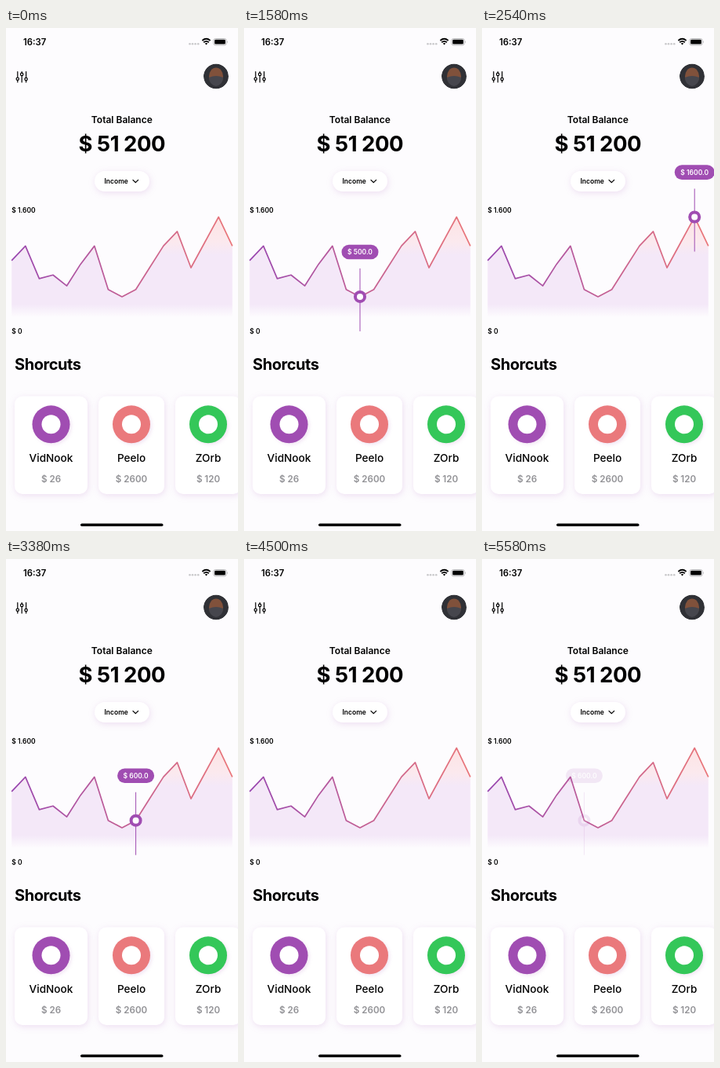
Animation of 296x640 px, one loop 5670 ms. Source, as an HTML page:

```html
<!DOCTYPE html>
<html lang="en">
<head>
<meta charset="utf-8">
<title>Balance chart</title>
<style>
  html, body { margin: 0; width: 100%; height: 100%; overflow: hidden; background: #fdfcfe; }
  svg { display: block; width: 296px; height: 640px; font-family: Inter, Roboto, sans-serif; font-weight: 600; }
  .middle { text-anchor: middle; }
  .small { font-size: 8.5px; }
  .stroke { fill: none; stroke: #000; stroke-linecap: round; stroke-linejoin: round; }
  .raised { fill: #fff; filter: drop-shadow(1px 2px 4px rgba(160, 77, 178, .17)); }
  .disc { filter: drop-shadow(2px 2px 2px rgba(160, 77, 178, .14)); }
</style>
</head>
<body>
<svg viewBox="0 0 296 640">
  <defs>
    <linearGradient id="ink" gradientUnits="userSpaceOnUse" x1="7" y1="0" x2="289" y2="0">
      <stop stop-color="#9847b0"/><stop offset="1" stop-color="#ea7679"/>
    </linearGradient>
    <linearGradient id="wash" gradientUnits="userSpaceOnUse" x1="0" y1="240" x2="0" y2="368">
      <stop stop-color="#fde3e3"/>
      <stop offset=".25" stop-color="#fbe9ee"/>
      <stop offset=".38" stop-color="#f4e8f8"/>
      <stop offset=".87" stop-color="#f4e8f8"/>
      <stop offset="1" stop-color="#f4e8f8" stop-opacity="0"/>
    </linearGradient>
    <clipPath id="portrait"><circle cx="268" cy="61.5" r="16"/></clipPath>
  </defs>

  <!-- status bar -->
  <text x="22" y="22" font-size="11.3">16:37</text>
  <g fill="#c9c9cb">
    <circle cx="234.5" cy="20.3" r="1.3"/><circle cx="238" cy="20.3" r="1.3"/>
    <circle cx="241.6" cy="20.3" r="1.3"/><circle cx="245.2" cy="20.3" r="1.3"/>
  </g>
  <g class="stroke" stroke-width="1.8" style="stroke-linecap: butt">
    <path d="M250.4 16Q255.5 11.6 260.6 16M252.2 18.3Q255.5 15.4 258.8 18.3"/>
  </g>
  <path d="M253.7 19.6Q255.5 18.2 257.3 19.6L255.5 21.6Z"/>
  <rect x="264.8" y="13.5" width="16.4" height="8.4" rx="2.5" fill="none" stroke="#a8a8aa" stroke-width=".8"/>
  <rect x="266.1" y="14.8" width="13.8" height="5.8" rx="1.4"/>
  <path d="M282.4 16.2q1.4 1.5 0 3z" fill="#a8a8aa"/>

  <!-- header -->
  <g class="stroke" stroke-width="1.2">
    <path d="M14.8 55.5V62.8M14.8 66.6V69M20.2 55.5V57M20.2 60.8V69M25.6 55.5V63.2M25.6 67V69"/>
    <circle cx="14.8" cy="64.7" r="1.7"/><circle cx="20.2" cy="58.9" r="1.7"/><circle cx="25.6" cy="65.1" r="1.7"/>
  </g>
  <g clip-path="url(#portrait)">
    <circle cx="268" cy="61.5" r="16" fill="#303136"/>
    <ellipse cx="268" cy="61.5" rx="9" ry="11" fill="#80513b"/>
    <path d="M259 63Q268 59 277 63Q277 72 268 74Q259 72 259 63Z" fill="#46464d"/>
  </g>
  <g class="middle">
    <text x="147.8" y="121" font-size="12">Total Balance</text>
    <text x="147.8" y="157" font-size="27.5" font-weight="700" letter-spacing="-.5">$ 51 200</text>
  </g>
  <rect class="raised" x="113" y="182" width="70" height="26" rx="13"/>
  <text class="small" x="125.5" y="198">Income</text>
  <path class="stroke" stroke-width="1.3" d="M162 193.4l3.3 3.2 3.3-3.2"/>

  <!-- chart -->
  <text class="small" x="7.3" y="235.3">$ 1.600</text>
  <text class="small" x="7.3" y="389.3">$ 0</text>
  <path id="area" fill="url(#wash)"/>
  <path id="line" fill="none" stroke="url(#ink)" stroke-width="1.7" stroke-linejoin="round"/>
  <g id="marker" fill="#a04db2">
    <rect x="-.5" y="-36" width="1" height="80"/>
    <circle r="8"/><circle r="4" fill="#fff"/>
    <rect id="bubble" y="-66.2" height="18.6" rx="9.3"/>
    <text id="amount" class="small middle" y="-53.8" fill="#fff"></text>
  </g>

  <text x="11" y="435.3" font-size="20" font-weight="700" letter-spacing="-.45">Shorcuts</text>
  <g id="cards"></g>
  <rect x="95" y="630.4" width="105.5" height="3.6" rx="1.8"/>
</svg>
<script>
const $ = id => document.getElementById(id);
const LOOP = 5670, FADE = 400;

const values = [1000, 1200, 750, 800, 650, 950, 1200, 600, 500, 600, 900, 1200, 1400, 900, 1250, 1600, 1200];
const points = values.map((v, i) => [7.2 + 17.6 * i, 388 - .0922 * v]);
const outline = 'M' + points.map(p => p.join(' ')).join('L');
$('line').setAttribute('d', outline);
$('area').setAttribute('d', outline + 'V368H7.2Z');

const cards = [
  { name: 'VidNook', price: '$ 26', x: 11, width: 93, color: '#a04db2' },
  { name: 'Peelo', price: '$ 2600', x: 118, width: 84, color: '#ea797c' },
  { name: 'ZOrb', price: '$ 120', x: 216, width: 84, color: '#34c759' },
];
$('cards').innerHTML = cards.map(({ name, price, x, width, color }) => `
  <rect class="raised" x="${x}" y="468.5" width="${width}" height="124.5" rx="10"/>
  <g class="middle" transform="translate(${x + width / 2} 504.3)">
    <circle class="disc" r="24" fill="${color}"/><circle r="12" fill="#fff"/>
    <text y="48" font-size="13.6" font-weight="500">${name}</text>
    <text y="73.5" font-size="11.6" fill="#929296">${price}</text>
  </g>`).join('');

// The finger snaps to a data point: [ms, point], each held until the next.
const scrub = [
  [0, 3], [1200, 3], [1310, 4], [1430, 5], [1580, 8], [1740, 10], [1860, 12], [2060, 15],
  [2700, 14], [2900, 11], [3380, 9], [3490, 7], [3770, 4], [3930, 3],
  [4160, 3], [4270, 3], [4380, 3], [4500, 3],
  [4830, 6], [4950, 6], [5060, 6], [5160, 6], [5270, 7], [5380, 7], [5480, 7], [5580, 7],
];
const touches = [{ down: 1120, up: 4080 }, { down: 4825, up: 5264 }];

function ramp(ms, start) {
  const u = Math.min(1, Math.max(0, (ms - start) / FADE));
  return u * u * (3 - 2 * u);
}

function draw(now) {
  const t = now % LOOP;
  const [ms, index] = scrub.findLast(step => step[0] <= t);
  const opacity = touches.reduce((sum, { down, up }) => sum + ramp(ms, down) - ramp(ms, up), 0);
  const value = values[index], width = value < 1000 ? 47 : 51;
  $('marker').setAttribute('transform', `translate(${points[index]})`);
  $('marker').setAttribute('opacity', opacity);
  $('bubble').setAttribute('x', -width / 2);
  $('bubble').setAttribute('width', width);
  $('amount').textContent = '$ ' + value.toFixed(1);
}

const start = performance.now();
function tick() {
  draw(performance.now() - start);
  requestAnimationFrame(tick);
}
tick();
</script>
</body>
</html>
```
